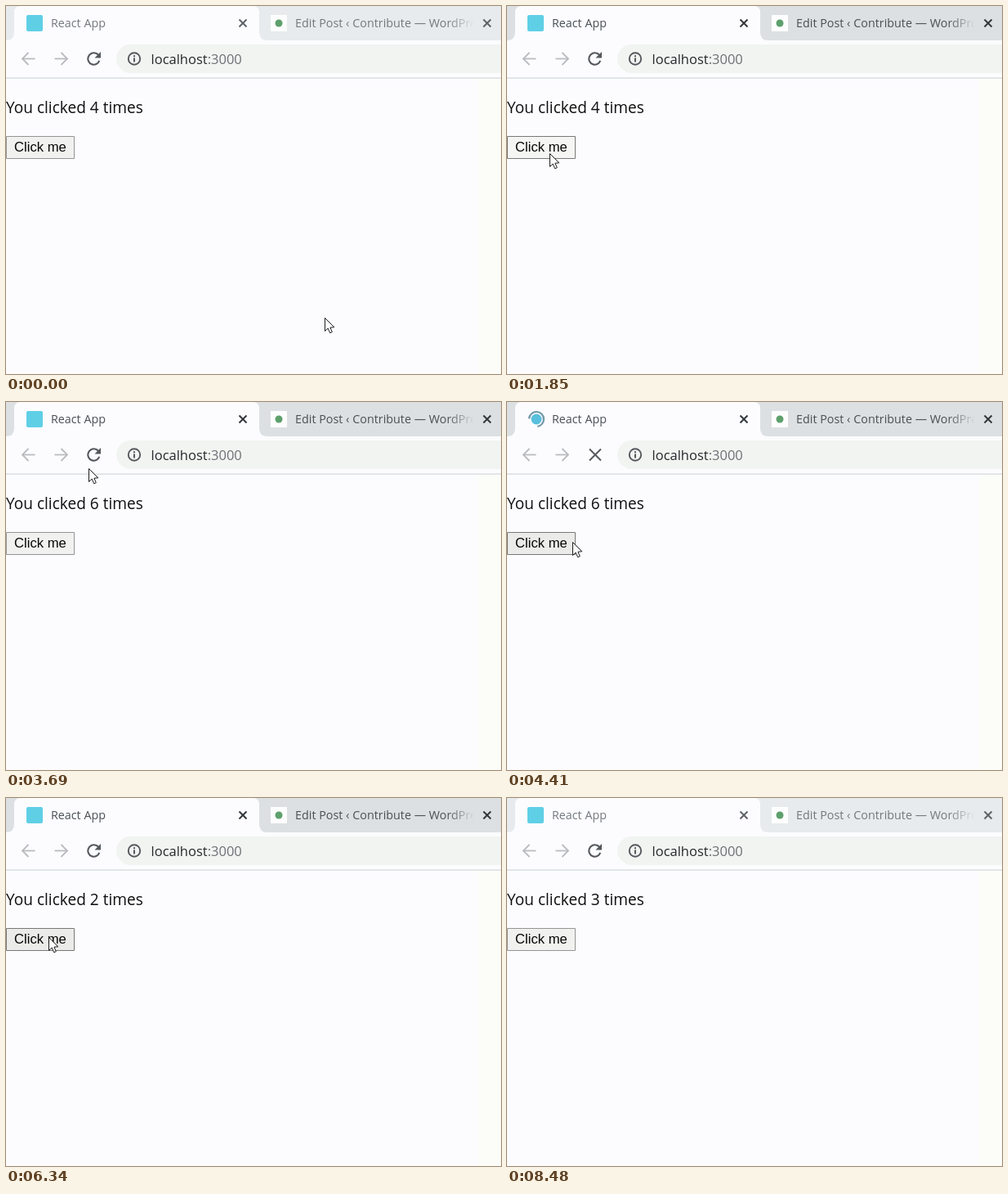
Write an HTML page with a canvas that moves like this. It is 606 px wide and 450 px high and loops after 8530 ms.

```html
<!DOCTYPE html>
<html lang="en">
<head>
<meta charset="utf-8">
<title>Click counter</title>
<style>
  html, body { margin: 0; width: 100%; height: 100%; overflow: hidden; background: #fcfcff; }
  canvas { display: block; width: 606px; height: 450px; }
</style>
</head>
<body>
<canvas id="stage" width="606" height="450"></canvas>
<script>
const ctx = document.getElementById('stage').getContext('2d');
const LOOP = 8530;
const UI = '"Open Sans", "Noto Sans", sans-serif';
const MONO_UI = '"Liberation Sans", Arial, sans-serif';
const PAGE = '#fcfcff';
const TAU = Math.PI * 2;

// Story: the button is clicked, the page reloads, the button is clicked again
const CLICKS = [1800, 3020, 5500, 6250, 7090];
const HOLD = 85;
const FOCUS = 1800, BLUR = 8480;
const RELOAD = 3900, LOADED = 4600;

// Pointer legs; sag dips the path downwards midway
const leg = (from, until, x, y, sag = 0) => ({ from, until, x, y, sag });
const START = { x: 390, y: 381 };
const LEGS = [
  leg(130, 800, 198, 267),
  leg(970, 1260, 52, 180),
  leg(1890, 2180, 60, 192),
  leg(2350, 2560, 64, 176),
  leg(3200, 3860, 108, 62),
  leg(4000, 4410, 80, 171),
  leg(4910, 5330, 52, 170, 22),
  leg(7175, 7590, 240, 452)
];

const TAB = new Path2D('M0 42Q10 42 10 32V8Q10 0 18 0H302Q310 0 310 8V32Q310 42 320 42Z');
const POINTER = new Path2D('M0 0V16L3.7 12.6 6.2 18.3 8.8 17.2 6.4 11.7 11.3 11.3Z');
const RELOAD_TIP = new Path2D('M116 56V63.5H108.5Z');

function pointerAt(t) {
  let { x, y } = START;
  for (const m of LEGS) {
    if (t <= m.from) break;
    const k = Math.min(1, (t - m.from) / (m.until - m.from));
    const e = k * k * (3 - 2 * k);
    x += (m.x - x) * e;
    y += (m.y - y) * e + m.sag * Math.sin(Math.PI * k);
  }
  return { x, y };
}

// The first visit begins at four clicks, the reload starts again from zero
function countAt(t) {
  const since = t < LOADED ? 0 : LOADED;
  const made = CLICKS.filter(c => c >= since && c + HOLD <= t).length;
  return made + (since ? 0 : 4);
}

function text(s, x, y, size, color, font = UI) {
  ctx.font = `${size}px ${font}`;
  ctx.fillStyle = color;
  ctx.fillText(s, x, y);
}

function box(x, y, w, h, color, r = 0) {
  ctx.fillStyle = color;
  ctx.beginPath();
  ctx.roundRect(x, y, w, h, r);
  ctx.fill();
}

const disc = (x, y, r, color) => box(x - r, y - r, 2 * r, 2 * r, color, r);

function ring(x, y, r, color, width, from = 0, to = TAU) {
  ctx.strokeStyle = color;
  ctx.lineWidth = width;
  ctx.beginPath();
  ctx.arc(x, y, r, from, to);
  ctx.stroke();
}

function line(points, color, width) {
  ctx.strokeStyle = color;
  ctx.lineWidth = width;
  ctx.beginPath();
  points.forEach(([x, y]) => ctx.lineTo(x, y));
  ctx.stroke();
}

function cross(x, y, r, color) {
  for (const d of [-r, r]) line([[x - r, y - d], [x + r, y + d]], color, 2);
}

function arrow(x, y, dir) {
  const color = '#b9bbbe', tip = x + 7.5 * dir;
  line([[x - 8 * dir, y], [tip, y]], color, 1.8);
  line([[x, y - 7.5], [tip, y], [x, y + 7.5]], color, 1.8);
}

function drawTabs(t, focused, loading) {
  const ink = focused ? '#4b4f53' : '#74787c';
  const closeInk = focused ? '#34373a' : '#5f6368';
  box(0, 0, 606, 42, focused ? '#dce0e3' : '#e7ebed');
  ctx.fillStyle = PAGE;
  ctx.fill(TAB);

  if (loading) {
    const turn = (t - RELOAD) / 1000 * TAU;
    ring(36, 21, 9, '#6f97a8', 2.2, turn, turn + 4.5);
    disc(36, 21, 6.5, '#58bfdc');
  } else {
    box(25, 11, 20, 20, '#5fcfe6', 2);
  }
  text('React App', 55, 26, 14.3, ink);
  cross(290, 21, 4.5, closeInk);

  box(324, 11, 20, 20, '#fdfdfd');
  disc(334, 21, 4.5, '#5da06c');
  const fade = ctx.createLinearGradient(540, 0, 573, 0);
  fade.addColorStop(0, ink);
  fade.addColorStop(1, ink + '00');
  text('Edit Post ‹ Contribute — WordPress', 354, 26, 14.35, fade);
  cross(589, 21, 4.5, closeInk);
}

function drawToolbar(loading, hover) {
  const ink = '#55585c';
  box(0, 87.5, 606, 1.2, '#d5d8da');
  arrow(27.5, 64.5, -1);
  arrow(67.5, 64.5, 1);

  if (hover) disc(107.5, 64.5, 17, '#f1f2f3');
  if (loading) {
    cross(108, 64.5, 7, ink);
  } else {
    ring(107.5, 64.5, 7.2, ink, 2.1, 0.35, 5.6);
    ctx.fillStyle = ink;
    ctx.fill(RELOAD_TIP);
  }

  box(135, 47, 500, 35, '#f2f4f2', 17.5);
  ring(157, 64.5, 7.2, ink, 1.9);
  box(156, 63.5, 2, 5, ink);
  box(156, 60.3, 2, 2, ink);
  text('localhost', 177.5, 71, 16.5, '#26282b');
  text(':3000', 177.5 + ctx.measureText('localhost').width, 71, 16.5, '#6c7074');
}

function drawPage(count, hover, pressed) {
  box(578, 89, 28, 361, '#fcfcf8');
  text(`You clicked ${count} times`, 0, 131, 19.1, '#101010');

  box(0, 159, 84, 28, hover ? '#787878' : '#949494', 1);
  box(1, 160, 82, 26, pressed ? '#f5f5f4' : hover ? '#ebebe9' : '#f1f1ef');
  text('Click me', 10, 178, 16.67, '#080808', MONO_UI);
}

function drawPointer({ x, y }) {
  ctx.save();
  ctx.translate(Math.round(x) + 0.5, Math.round(y) + 0.5);
  ctx.fillStyle = '#fff';
  ctx.fill(POINTER);
  ctx.strokeStyle = '#1c1c1c';
  ctx.lineWidth = 1;
  ctx.stroke(POINTER);
  ctx.restore();
}

function draw(t) {
  const p = pointerAt(t);
  const focused = t >= FOCUS && t < BLUR;
  const loading = t >= RELOAD && t < LOADED;
  const overButton = t > 1260 && p.x < 84 && p.y >= 159 && p.y < 187;
  const overReload = Math.hypot(p.x - 107.5, p.y - 64.5) < 17;
  const pressed = CLICKS.some(c => t >= c && t < c + HOLD);

  box(0, 0, 606, 450, PAGE);
  drawTabs(t, focused, loading);
  drawToolbar(loading, overReload);
  drawPage(countAt(t), overButton, pressed);
  drawPointer(p);
}

const start = performance.now();
function tick() {
  draw((performance.now() - start) % LOOP);
  requestAnimationFrame(tick);
}
tick();
</script>
</body>
</html>
```
